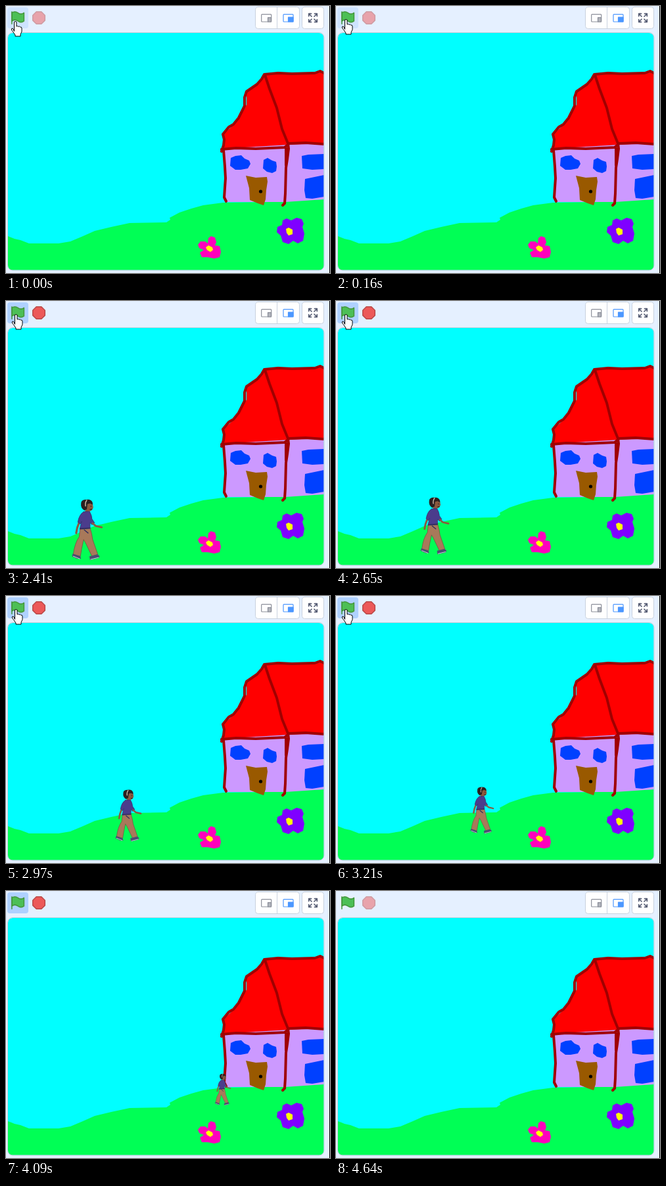
These frames come from a looping animation (493x406 px, 6.64 s). An HTML page:

```html
<!DOCTYPE html>
<html lang="sr">
<head>
<meta charset="utf-8">
<title>Walk home</title>
<style>
  html, body { margin: 0; width: 100%; height: 100%; overflow: hidden; background: #e5f0ff; }
  svg { display: block; }
</style>
</head>
<body>
<svg width="493" height="406" viewBox="0 0 493 406" stroke-linejoin="round" stroke-linecap="round">
  <defs>
    <clipPath id="stageClip"><rect x="3" y="41" width="480.5" height="360.5" rx="7"/></clipPath>
  </defs>
  <rect width="493" height="406" fill="#e5f0ff"/>
  <rect x="492" width="1" height="406"/>

  <!-- toolbar -->
  <rect id="highlight" x="2" y="2" width="32" height="32" rx="4"/>
  <g transform="translate(8 8) scale(1.2)" fill="#4cbf56" stroke="#45993d" stroke-width="1.3">
    <path d="M.75 2A6.44 6.44 0 0 1 8.44 2A6.44 6.44 0 0 0 16.13 2V12.4A6.44 6.44 0 0 1 8.44 12.4A6.44 6.44 0 0 0 .75 12.4Z"/>
    <path d="M.75 16V.75"/>
  </g>
  <path id="stop" transform="translate(40 8) scale(1.43)" fill="#ec5959" stroke="#b84848"
    d="M4.3 .5H9.7L13.5 4.3V9.7L9.7 13.5H4.3L.5 9.7V4.3Z"/>
  <g fill="#fff" stroke="#c8d2df">
    <rect x="379.5" y="1.5" width="67" height="33" rx="4"/>
    <path d="M412.5 2V34"/>
    <rect x="450.5" y="1.5" width="33" height="33" rx="4"/>
  </g>
  <g fill="none" stroke="#8c8f9a" stroke-width="1.2">
    <rect x="388.7" y="12.6" width="15" height="11.4" rx="1"/>
    <rect x="398.5" y="17.6" width="5" height="6.4" fill="#b3b5bc"/>
  </g>
  <g fill="none" stroke="#4c97ff" stroke-width="1.2">
    <rect x="422" y="12.6" width="15" height="11.4" rx="1"/>
    <rect x="429.5" y="17" width="7.5" height="7" fill="#4c97ff"/>
  </g>
  <g id="expand" fill="none" stroke="#575e75" stroke-width="1.7"></g>

  <!-- stage -->
  <g clip-path="url(#stageClip)">
    <rect x="3" y="41" width="481" height="361" fill="#0ff"/>
    <path fill="#00ff55" d="M3 350L13 354L22 356L35 361H80L98 358L117 350L135 342L160 336L188 330L244 329L250 325L249 322L264 314L282 308L300 303L330 299L400 298L484 294V402H3Z"/>
    <path fill="#cc99ff" d="M331 216L484 208V294L425 298H334Z"/>
    <path fill="#f00" d="M394 104L479 101L484 102V209L429 211L330 217V196L352 175L366 150V132L385 118Z"/>
    <g fill="none" stroke="#a00000" stroke-width="4">
      <path d="M484 102L478 99L470 102L435 103L414 102L393 104L389 111L382 119L366 130L363 139V152L354 170L346 180L339 184L330 195L332 203L331 212L328 221"/>
      <path d="M394 105L401 126L412 155L420 187L429 209L430 217L428 233L426 246L425 285L424 300L421 303"/>
      <path d="M328 218L350 216L380 217L424 215L431 209L456 208L484 210"/>
      <path d="M331 219L333 244L334 262L332 291L335 297M426 216V242"/>
    </g>
    <g fill="#0040ff">
      <path d="M342 231L349 228L358 227L363 232L370 235L372 240L368 247L357 249L349 249L341 243Z"/>
      <path d="M392 234L398 231L405 235L411 237L412 244L411 251L405 254L397 252L391 247Z"/>
      <path d="M450 228L460 226L484 225V248L466 249L451 247Z"/>
      <path d="M455 263L484 257V290L466 293L456 292L454 280Z"/>
    </g>
    <path fill="#995900" d="M365 258L380 261L397 260L398 267L396 280L395 294L392 303L383 300L371 295L370 277Z"/>
    <circle cx="387.5" cy="282" r="2.6"/>
    <path fill="#ff00bb" d="M307 361L308 353L312 350L318 352L320 359L318 364L325 365L327 374L325 382L317 384L307 382L298 382L295 375L301 371L294 368L292 363L296 358L303 358Z"/>
    <path fill="#ff0" d="M304 367L308 364L314 367L315 371L311 374L306 371Z"/>
    <path fill="#7f00ff" d="M421 326L427 323L434 326L442 322L450 324L453 331L451 336L454 346L452 357L444 361L437 357L430 362L421 359L418 349L412 344L413 336L420 333Z"/>
    <path fill="#ff0" d="M426 339L430 337L436 340L436 347L430 349L427 345Z"/>

    <g id="walker">
      <g fill="none" stroke="#8b5a3e" stroke-width="3.2">
        <path d="M103 336L99 347L97.5 355"/>
      </g>
      <path fill="#a8795a" stroke="#76513b" stroke-width=".8" d="M104 347H119Q122 356 123 365L131 388L122 391L112 370L109 365L106 379L104 391L93 388Q95 371 102 361Z"/>
      <path fill="#4b4e72" d="M92 387L104 391L105 395L99 395L91 391ZM118 391L131 388L134 391L132 394L119 397Z"/>
      <path stroke="#d8d8e2" fill="none" d="M93 391L103 395M120 396L132 393"/>
      <path fill="#8b5a3e" d="M112 316H119L118 325L111 324Z"/>
      <path fill="#4b3c8c" stroke="#36306b" stroke-width=".8" d="M109 322L118 321Q122 328 122 333L126 339L122 342L119 339L119 348L103 349L106 337L104 341L100 338Q102 326 109 322Z"/>
      <path fill="none" stroke="#2f2d5d" stroke-width="1.4" d="M104 348L119 347M110 350L116 355"/>
      <path fill="none" stroke="#8b5a3e" stroke-width="3" d="M123 340L128 344L137 346"/>
      <path fill="#8b5a3e" d="M112 309Q120 305 123 310L124 315Q122 322 116 321Q111 319 111 314Z"/>
      <path fill="#2b2020" d="M105 309Q105 303 113 303Q121 302 123 308L123 311L119 309L115 310L114 318L110 320Q104 316 105 309Z"/>
      <path fill="none" stroke="#d9c4b0" stroke-width="1.4" d="M114 304Q111 308 112 313"/>
      <path stroke="#2b2020" stroke-width="1.2" d="M120.5 313V314M119 318.5L122 318"/>
    </g>
    <g id="bubble">
      <path fill="#fff" stroke="#000" stroke-opacity=".15" stroke-width="4" paint-order="stroke"
        d="M142 255H202A16 16 0 0 1 218 271V275A16 16 0 0 1 202 291H158Q150 300 141 303Q136 304 139 300Q141 295 140 291A15 16 0 0 1 126 275V271A16 16 0 0 1 142 255Z"/>
      <text x="136" y="278" font-size="14" font-family="'Liberation Sans', Arial, sans-serif" fill="#575e75">Идем кући.</text>
    </g>
  </g>
  <rect x="2.5" y="40.5" width="481.5" height="361.5" rx="7.5" fill="none" stroke="#c3ccd9"/>

  <g fill="#fff" stroke="#000">
    <path id="hand" d="M5 15V2Q5 .5 6.8 .5T8.5 2V8Q10 6.8 11.3 8.3Q13 7.3 14.2 9Q16.5 8.5 16.5 11V16L14.5 20V23H6.5V21Q3 16 .8 13Q.5 10.5 2.5 11Z"/>
    <path id="arrow" transform="translate(13 57)" stroke-width=".9" d="M.5 .5V16.5L4 13L6.5 19L9 18L6.5 12H11.5Z"/>
  </g>
</svg>
<script>
const LOOP = 6640, START = 1360, WALK = 2410, PAUSE = 4090, RESUME = 4240, END = 4640;
const TICK = 80, STEP = 72;
const el = id => document.getElementById(id);
const show = (id, on) => el(id).setAttribute('display', on ? 'inline' : 'none');
const place = (id, x, y) => el(id).setAttribute('transform', `translate(${x} ${y})`);

el('expand').innerHTML = [[1, 1], [-1, 1], [1, -1], [-1, -1]].map(([sx, sy]) =>
  `<path transform="translate(467 18) scale(${sx} ${sy})" d="M2 2L6 6M2.5 6.3H6.3V2.5"/>`).join('');

// Number of walking steps completed, sampled on the display tick.
function stepsAt(t) {
  if (t < WALK) return 0;
  const base = t < RESUME ? WALK : RESUME;
  const sampled = base + Math.floor((t - base) / TICK) * TICK;
  const shown = t < RESUME ? Math.min(sampled, PAUSE) : sampled;
  return 1 + Math.floor((shown - WALK) / STEP);
}

function render(t) {
  const running = t >= START && t < END;
  show('highlight', t < END);
  el('highlight').setAttribute('fill', running ? '#afd1ff' : '#cee3ff');
  el('stop').setAttribute('opacity', running ? 1 : 0.5);
  show('bubble', running && t < WALK);
  show('walker', running);

  const n = stepsAt(t);
  const size = (94 - 1.92 * n) / 94;
  el('walker').setAttribute('transform',
    `translate(${113.5 + 9 * n} ${397 - 2.96 * n}) scale(${size}) translate(-113.5 -397)`);

  show('hand', t < 3450);
  show('arrow', t >= 3450 && t < 3610);
  if (t < 80) place('hand', 7.5, 23);
  else if (t < 160) place('hand', 1.5, 12);
  else place('hand', 8.5, 20);
}

const began = performance.now();
function frame() {
  render((performance.now() - began) % LOOP);
  requestAnimationFrame(frame);
}
render(0);
requestAnimationFrame(frame);
</script>
</body>
</html>
```
